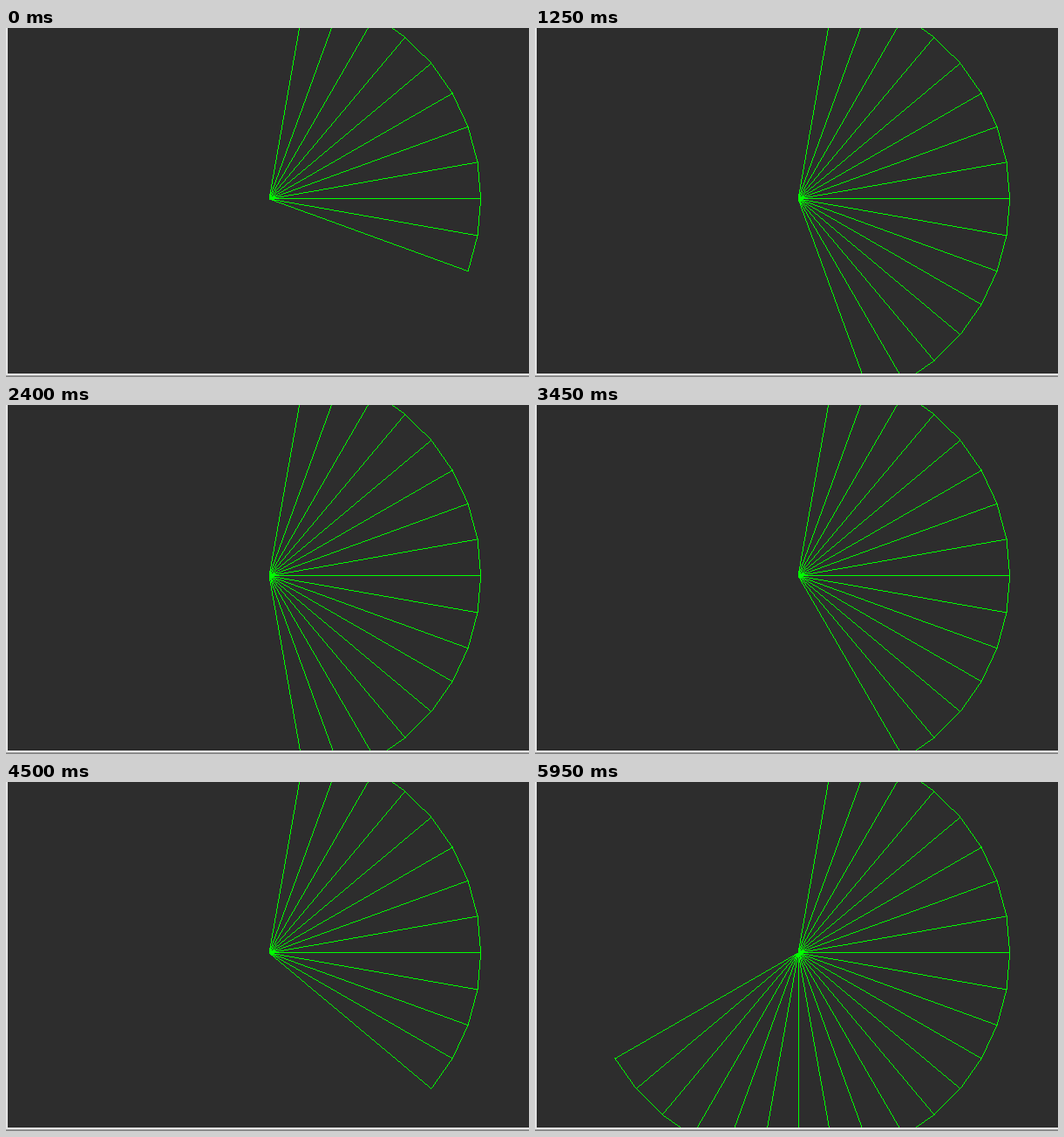
Animation of 600x400 px, one loop 6 s. Source, as an HTML page with a canvas:

```html
<!DOCTYPE html>
<html lang="en">
<head>
<meta charset="utf-8">
<title>Growing triangle fan</title>
<style>
  html, body { margin: 0; width: 100%; height: 100%; overflow: hidden; background: #2d2d2d; }
  canvas { display: block; width: 600px; height: 400px; }
</style>
</head>
<body>
<canvas id="stage" width="600" height="400"></canvas>
<script>
const ctx = document.getElementById('stage').getContext('2d');

const LOOP = 6000, TICK = 50;   // the picture is refreshed every tick
const SPOKE_TIME = 30;          // one more spoke every 30 ms
const SPOKES = 36, START = 11.5;
const CX = 302, CY = 195.95;
const RX = 242.7, RY = 242;     // the fan is a touch wider than tall
const FLOOR = 396;              // bottom of the drawing area

function rect(color, x, y, w, h) {
  ctx.fillStyle = color;
  ctx.fillRect(x, y, w, h);
}

// The tiny angle offset settles pixel ties on the axes.
function rim(k) {
  const a = (k * 10 - 0.01) * Math.PI / 180;
  return [CX + RX * Math.sin(a), CY - RY * Math.cos(a)];
}

// One-pixel line without antialiasing, sampled at pixel centres.
function line([x0, y0], [x1, y1]) {
  const dx = x1 - x0, dy = y1 - y0;
  if (Math.abs(dx) >= Math.abs(dy)) {
    const end = Math.floor(Math.max(x0, x1));
    for (let x = Math.floor(Math.min(x0, x1)); x <= end; x++) {
      const u = Math.min(1, Math.max(0, (x + 0.5 - x0) / dx));
      ctx.fillRect(x, Math.floor(y0 + u * dy), 1, 1);
    }
  } else {
    const end = Math.floor(Math.max(y0, y1));
    for (let y = Math.floor(Math.min(y0, y1)); y <= end; y++) {
      const u = Math.min(1, Math.max(0, (y + 0.5 - y0) / dy));
      ctx.fillRect(Math.floor(x0 + u * dx), y, 1, 1);
    }
  }
}

function drawBorder() {
  rect('#e3e3e3', 0, 0, 2, 398);
  rect('#e3e3e3', 0, FLOOR, 600, 2);
  rect('#a0a0a0', 0, 398, 600, 1);
  rect('#808080', 0, 399, 600, 1);
}

function draw(count) {
  rect('#2d2d2d', 0, 0, 600, 400);
  ctx.fillStyle = '#00ff00';
  // A fan needs two rim points before its first triangle shows.
  if (count > 1) {
    for (let k = 1; k <= count; k++) {
      line([CX, CY], rim(k));
      if (k > 1) line(rim(k - 1), rim(k));
    }
  }
  drawBorder();
}

const begin = performance.now();
let shown = -1;

function frame() {
  const time = (performance.now() - begin) % LOOP;
  const tick = Math.floor(time / TICK);
  if (tick !== shown) {
    shown = tick;
    draw(Math.floor(START + tick * TICK / SPOKE_TIME) % (SPOKES + 1));
  }
  requestAnimationFrame(frame);
}
frame();
</script>
</body>
</html>
```
